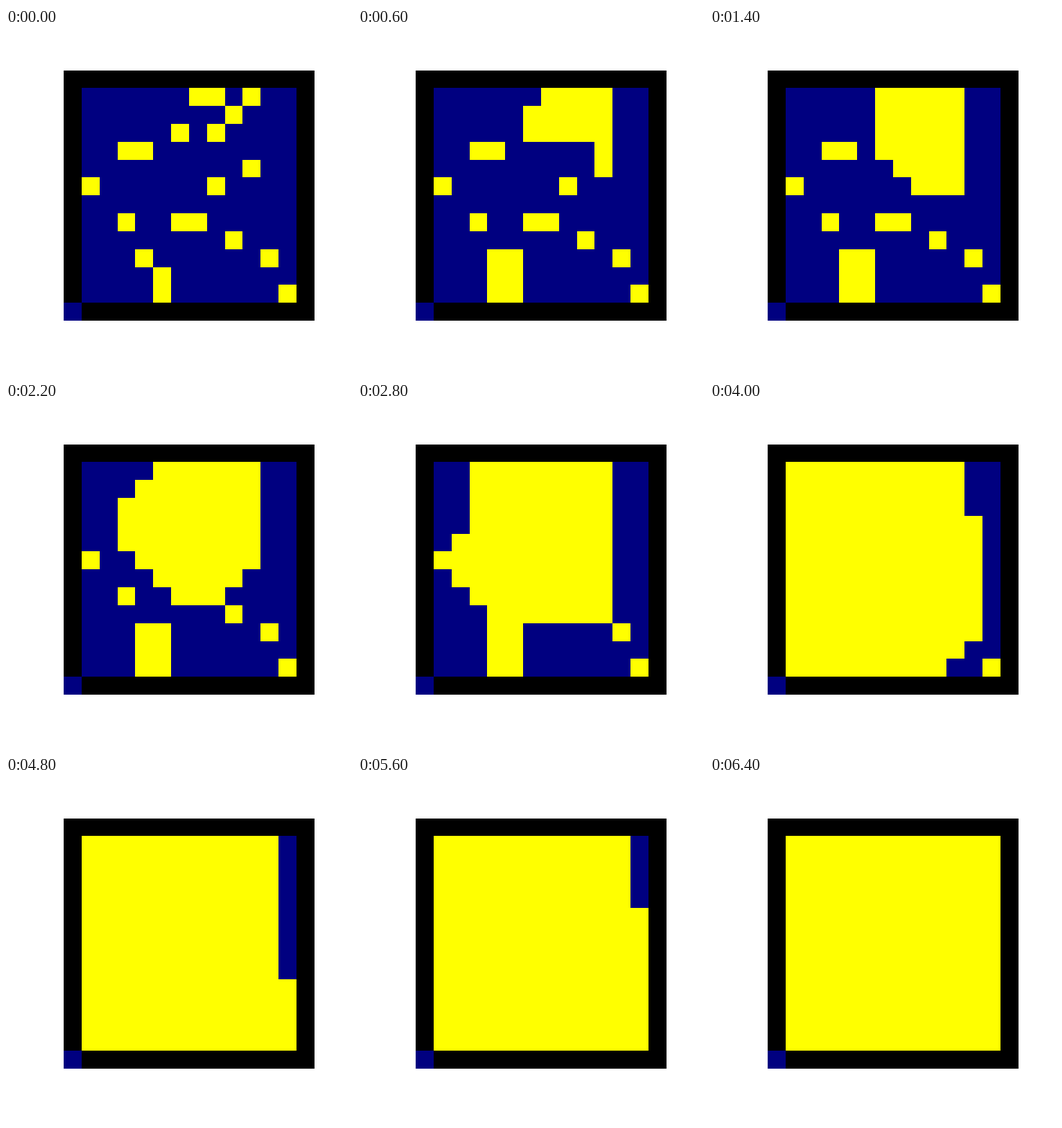
Write a matplotlib script that moves like this. It is 480 by 480 pixels and loops after 7900 ms.

```python
import numpy as np
import matplotlib.pyplot as plt
from matplotlib.animation import FuncAnimation
from matplotlib.colors import ListedColormap

STAGE = 480
CELLS = 14
TICK_MS, LOOP_MS, STEP_MS = 100, 7900, 200
EMPTY, FULL, WALL, OUTSIDE = range(4)
PALETTE = ListedColormap(["navy", "yellow", "black", "white"])


def seed_streaks():
    """Straight streaks of evenly spaced cells, as (rows, columns)."""
    k = np.arange(3)
    yield 1 + k, 10 - k
    yield 6 + 2 * k, 8 - 2 * k
    yield 8 + 2 * k, 3 + k
    yield 8 + k, 7 + 2 * k
    k = np.arange(2)
    yield 1 + 2 * k, 8 - 2 * k
    yield 4 + 2 * k, 3 - 2 * k
    yield 1 + 3 * k, 7 - 3 * k
    yield 5 + 3 * k, 10 - 3 * k
    yield 11 + k, 5 + 7 * k


def start_grid():
    grid = np.full((CELLS, CELLS), WALL)
    grid[1:-1, 1:-1] = EMPTY
    grid[-1, 0] = EMPTY
    for rows, cols in seed_streaks():
        grid[rows, cols] = FULL
    return grid


def grow(grid):
    """An empty cell fills when at least two of its four neighbours are full."""
    full = (grid == FULL).astype(int)
    count = full[:-2, 1:-1] + full[2:, 1:-1] + full[1:-1, :-2] + full[1:-1, 2:]
    result = grid.copy()
    result[1:-1, 1:-1][count >= 2] = FULL
    return result


def history():
    """All states from the seeds until nothing changes any more."""
    grids = [start_grid()]
    while True:
        following = grow(grids[-1])
        if np.array_equal(following, grids[-1]):
            return grids
        grids.append(following)


def pixel_cells(start, pitch=24.82):
    """Cell index under each pixel along one axis, -1 outside the board."""
    edges = np.floor(start + pitch * np.arange(CELLS + 1) + 0.5)
    index = np.searchsorted(edges, np.arange(STAGE), side="right") - 1
    return np.where(index < CELLS, index, -1)


ROWS, COLS = pixel_cells(58.52), pixel_cells(80.2)


def render(grid):
    padded = np.pad(grid, (0, 1), constant_values=OUTSIDE)
    return padded[np.ix_(ROWS, COLS)]


GRIDS = history()

fig = plt.figure(figsize=(4.8, 4.8), dpi=100, facecolor="white")
ax = fig.add_axes([0, 0, 1, 1])
ax.axis("off")
board = ax.imshow(render(GRIDS[0]), cmap=PALETTE, vmin=EMPTY, vmax=OUTSIDE,
                  interpolation="nearest", aspect="auto")


def update(frame):
    step = min(frame * TICK_MS // STEP_MS, len(GRIDS) - 1)
    board.set_data(render(GRIDS[step]))
    return [board]


anim = FuncAnimation(fig, update, frames=LOOP_MS // TICK_MS, interval=TICK_MS,
                     repeat=True, repeat_delay=0)
plt.show()
```
